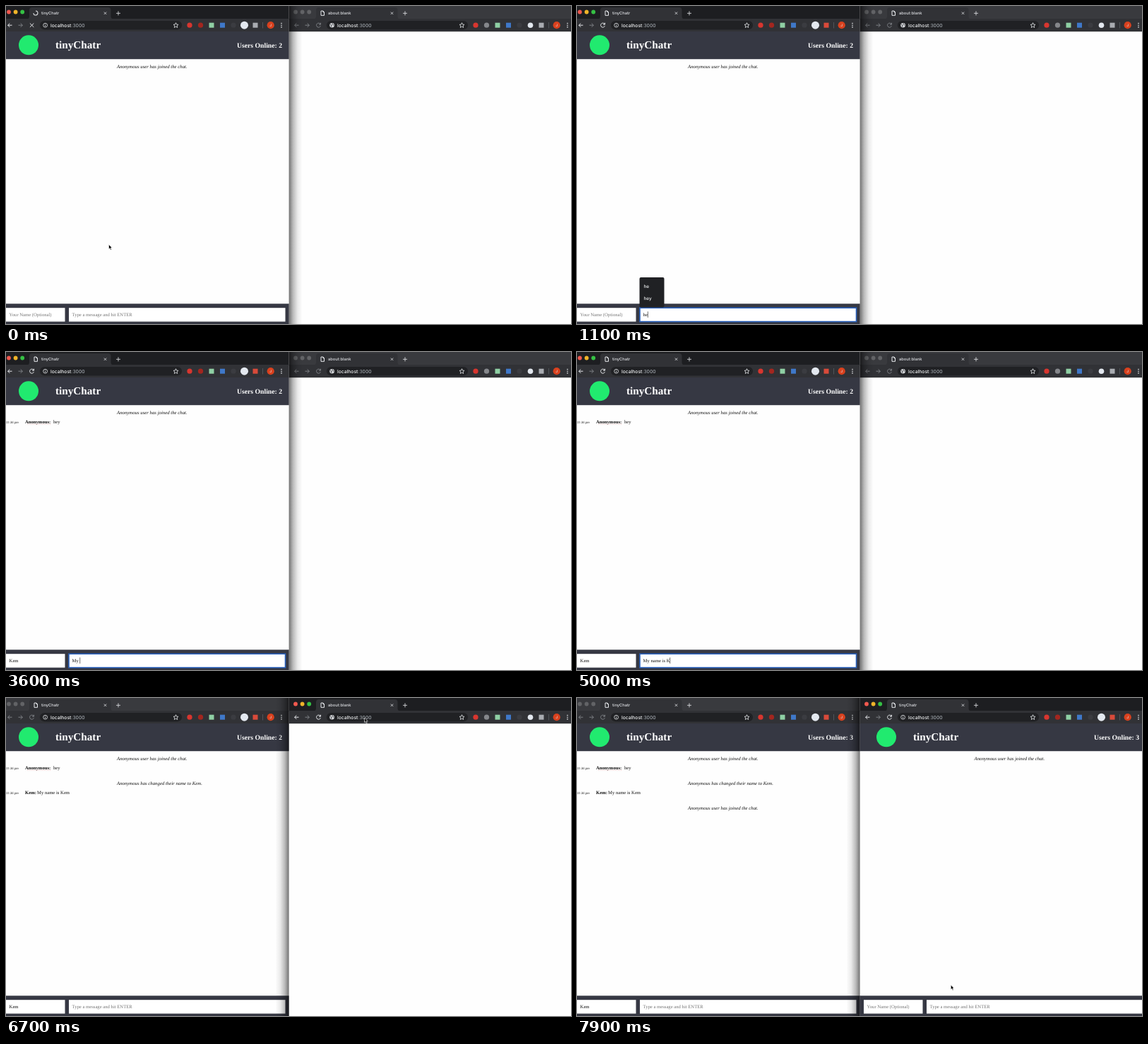
Recreate the animation shown at these times as an HTML page. Size 800x450 px, loop 8000 ms.

```html
<!DOCTYPE html>
<html lang="en">
<head>
<meta charset="utf-8">
<title>Chat demo</title>
<style>
html, body { margin: 0; width: 100%; height: 100%; overflow: hidden; background: #fefefe; }
svg { display: block; width: 800px; height: 450px; }
text { font: 6.67px "Liberation Serif", serif; fill: #111; white-space: pre; text-rendering: geometricPrecision; }
.ui { font: 500 5.75px Inter, sans-serif; fill: #dfe1e5; }
.url { font: 500 6.75px Inter, sans-serif; fill: #f1f3f4; }
.dim { fill: #9aa0a6; }
.menu { font: 500 6.4px Inter, sans-serif; fill: #f1f3f4; }
.title { font-weight: bold; font-size: 15.2px; fill: #fff; }
.users { font-weight: bold; font-size: 9.7px; fill: #fff; }
.note { font-style: italic; font-size: 6.77px; }
.time { font-style: italic; font-size: 4.75px; }
.name { font-weight: bold; }
.hint { fill: #757575; }
.line { fill: none; stroke: #e8eaed; stroke-width: 1; }
.bar { fill: #363843; }
</style>
</head>
<body>
<svg id="stage" viewBox="0 0 800 450"></svg>
<script>
const LOOP = 8000;
const NAME = 'Kem';
const stage = document.getElementById('stage');
const $ = id => document.getElementById(id);
const show = (id, on) => $(id).setAttribute('visibility', on ? 'inherit' : 'hidden');
const attr = (id, key, value) => $(id).setAttribute(key, value);
const text = (x, y, cls, s, extra = '') => `<text x="${x}" y="${y}" class="${cls}" ${extra}>${s}</text>`;
const rect = (x, y, w, h, fill, extra = '') =>
  `<rect x="${x}" y="${y}" width="${w}" height="${h}" fill="${fill}" ${extra}/>`;
const dot = (x, y, r, fill, extra = '') => `<circle cx="${x}" cy="${y}" r="${r}" fill="${fill}" ${extra}/>`;
const line = (d, extra = '') => `<path d="${d}" class="line" ${extra}/>`;

function tabBar(w) {
  const lights = [4, 13.6, 23.2].map((x, i) => dot(x, 8.5, 2.9, '#5f6063', `id="${w}light${i}"`)).join('');
  return rect(-6, 0, 412, 18.5, '#1d1e21', `id="${w}strip"`) + lights +
    `<path d="M29 18.5Q33 18.5 33 14.5V6Q33 2 37 2H144.500Q148.500 2 148.500 6V14.500Q148.500 18.500 152.500 18.500Z" fill="#313236"/>` +
    line('M40 7H43L44.500 8.700V13.300H40ZM43 7V8.700H44.500', `id="${w}file" stroke-width=".8"`) +
    `<g id="${w}spin">${line('M42 7A3 3 0 1 1 39 10')}</g>` +
    text(50, 12.2, 'ui', 'tinyChatr', `id="${w}tab"`) +
    line('M138.800 8.500L142.200 11.900M142.200 8.500L138.800 11.900', 'style="stroke-width:.8"') +
    line('M156 10.300H162M159 7.300V13.300', 'style="stroke-width:.8"');
}

function toolBar(w, shift) {
  const icons = [[260, '#d8362f'], [275.5, '#a3261f'], [291, '#8fd0a4'], [306.500, '#3f78c9'], [322, '#3b3c41'],
    [337.5, '#e3e8ef'], [353, '#d94a3a']]
    .map(([x, c], i) => i === 2 || i === 3 || i === 6
      ? rect(x - 3.5, 23.700, 7, 7, c, `id="${w}ext${i}"`)
      : dot(x, 27.2, i === 5 ? 5.5 : 3.6, c, `id="${w}ext${i}"`)).join('');
  return rect(-6, 18, 412, 18.2, '#313236') +
    line('M8.500 27.200H2.700M5.300 24.500L2.600 27.200L5.300 29.900', `id="${w}back"`) +
    line('M17.500 27.200H23.300M20.700 24.500L23.400 27.200L20.700 29.900', 'style="stroke:#7d8085"') +
    line('M39 25.400A3 3 0 1 0 39.400 28.200M39.500 23.800V26.200H37', `id="${w}reload"`) +
    line('M33.900 24.500L39.300 29.900M39.300 24.500L33.900 29.900', `id="${w}stop"`) +
    rect(48, 21, 201 - shift, 12.4, '#202124', 'rx="6.2"') +
    `<g id="${w}info">${line('M52.700 27.200A2.900 2.900 0 1 0 58.500 27.200A2.900 2.900 0 1 0 52.700 27.200M55.600 26.800V29M55.600 25.200V26', 'style="stroke-width:.8"')}</g>` +
    `<g id="${w}globe">${dot(55.6, 27.2, 3.3, '#d5d7da')}${line('M53.300 26L55 27.200L54.500 29.500M56 24.500L57 26.500L58.200 27.500', 'style="stroke:#34363a"')}</g>` +
    text(63, 29.5, 'url', 'localhost<tspan class="dim">:3000</tspan>') +
    `<g transform="translate(${-shift})">` +
    line('M240.500 23.700L241.500 26.100L244 26.300L242.100 28L242.700 30.500L240.500 29.200L238.300 30.500L238.900 28L237 26.300L239.500 26.100Z', 'style="stroke-width:.8"') +
    icons + rect(363.2, 23, .7, 8.5, '#5f6368') + dot(374.700, 27.2, 5.1, '#d9411e') +
    text(374.7, 29.1, 'ui', 'J', 'text-anchor="middle" style="font-size:5px"') +
    [24.5, 27.2, 29.9].map(y => dot(390, y, .8, '#e8eaed')).join('') + '</g>';
}

function page(w, shift) {
  const note = (id, y, s) => text(157 - shift / 2, y, 'note', s, `id="${w}${id}"`);
  const message = (id, y, who, x, s) => `<g id="${w}${id}">` + text(0, y + .2, 'time', '11:36 pm') +
    text(27, y, 'name', who + ':') + text(x, y, '', s) + '</g>';
  const field = (id, x, width) =>
    rect(x, 427.2, width, 19.4, '#fff', `id="${w}${id}Box"`) +
    text(x + 4.6, 438.8, 'hint', '', `id="${w}${id}"`) +
    rect(0, 432.3, .6, 8.6, '#111', `id="${w}${id}Caret"`);
  return `<g id="${w}page">` +
    rect(-6, 36, 412, 39.2, '', 'class="bar" style="fill:#363843"') +
    dot(32, 55.3, 14, '#21ea6f') + text(70, 60.3, 'title', 'tinyChatr') +
    text(391 - shift, 58.7, 'users', 'Users Online: 2', `id="${w}users" text-anchor="end"`) +
    note('join', 88, 'Anonymous user has joined the chat.') +
    message('msg1', 100.7, 'Anonymous', 67, 'hey') +
    `<path id="${w}under" d="M30 102.200H63" stroke="#d88" stroke-width=".6" stroke-dasharray="1 1"/>` +
    note('rename', 123.2, `Anonymous has changed their name to ${NAME}.`) +
    message('msg2', 135.8, NAME, 44, `My name is ${NAME}`) +
    note('join2', 158.4, 'Anonymous user has joined the chat.') +
    rect(-6, 421.3, 412, 29, '#363843') +
    field('who', 0, 83.5) + field('say', 89, 306.5) +
    `<g id="${w}hints">` + rect(88.5, 384, 35, 42.5, '#202124', 'rx="2"') +
    text(94.5, 399, 'menu', 'he', `id="${w}hint1"`) + text(94.5, 416, 'menu', 'hey') + '</g></g>';
}

const browser = (w, x, shift) => `<g transform="translate(${x})">` +
  rect(-5, 36, 411, 414, '#fefefe') + tabBar(w) + toolBar(w, shift) + page(w, shift) + '</g>';

const fade = (id, from, to) => `<linearGradient id="${id}" x1="${from}" x2="${to}">` +
  [[0, .55], [.3, .27], [.65, .08], [1, 0]].map(([o, a]) => `<stop offset="${o}" stop-opacity="${a}"/>`).join('') +
  '</linearGradient>';

stage.innerHTML = `<defs>${fade('toRight', 0, 1)}${fade('toLeft', 1, 0)}
  <clipPath id="leftHalf"><rect width="400.600" height="450"/></clipPath>
  <clipPath id="rightHalf"><rect x="400.600" width="400" height="450"/></clipPath></defs>
  <g clip-path="url(#leftHalf)">${browser('L', 0, 0)}</g>
  <g clip-path="url(#rightHalf)">${browser('R', 406, 1)}</g>` +
  rect(400.6, 0, 19, 450, 'url(#toRight)', 'id="shadeR"') +
  rect(381.6, 0, 19, 450, 'url(#toLeft)', 'id="shadeL"') +
  `<g id="mouse"><path id="arrow" d="M0 0V6.600L1.500 5.200L2.600 7.800L3.800 7.300L2.700 4.800H4.700Z" stroke="#fff" stroke-width=".6"/>
  <path id="beam" d="M-1.500 0Q0 0 0 1V7Q0 8 -1.500 8M1.500 0Q0 0 0 1M0 7Q0 8 1.500 8" fill="none" stroke="#222" stroke-width=".7"/></g>`;

// Each table holds [time, value...] steps.
const latest = (steps, t) => steps.filter(s => s[0] <= t).pop()?.[1] ?? '';
const typing = (s, from, step) => [...s].map((_, i) => [from + i * step, s.slice(0, i + 1)]);
const sayKeys = [
  ...typing('hey', 1000, 100), [1600, ''],
  ...typing('My name is ' + NAME[0], 3400, 90), [4600, 'My name is ' + NAME.slice(0, 2)],
  [5000, 'My name is ' + NAME[0]], [5100, 'My name is ' + NAME.slice(0, 2)],
  [5200, 'My name is ' + NAME], [5600, '']
];
const whoKeys = typing(NAME, 2500, 100);
const focusKeys = [[600, 'say'], [2200, 'who'], [3100, 'say'], [6600, '']];
const path = [
  [0, 145.5, 337.5], [100, 145.5, 337.5], [600, 150, 432], [1600, 150, 432], [2200, 42, 432],
  [5600, 42, 432], [6400, 507.5, 28], [6900, 507.5, 28], [7300, 493.5, 210], [7800, 528.6, 394.5],
  [7900, 529.3, 406], [8000, 529.3, 406]
];

function mouseAt(t) {
  const i = path.findIndex(p => p[0] > t);
  const [a, b] = [path[i - 1], path[i]];
  const u = (t - a[0]) / (b[0] - a[0]);
  const k = u * u * (3 - 2 * u);
  return [a[1] + (b[1] - a[1]) * k, a[2] + (b[2] - a[2]) * k];
}

function chrome(w, active, loading, t) {
  ['#f0584e', '#f0b429', '#35c144'].forEach((c, i) => attr(w + 'light' + i, 'fill', active ? c : '#626366'));
  attr(w + 'strip', 'fill', active ? '#1d1e21' : '#393a3e');
  for (const id of ['back', 'reload']) $(w + id).style.stroke = active ? '#e8eaed' : '#7d8085';
  show(w + 'spin', loading);
  show(w + 'file', !loading);
  show(w + 'stop', loading);
  show(w + 'reload', !loading);
  attr(w + 'spin', 'transform', `rotate(${t * .36 % 360} 42 10)`);
}

function field(id, value, hint, focused) {
  const el = $(id);
  el.textContent = value || hint;
  attr(id, 'class', value ? '' : 'hint');
  attr(id + 'Box', 'stroke', focused ? '#2a61bd' : 'none');
  attr(id + 'Box', 'stroke-width', 1.6);
  show(id + 'Caret', focused && value);
  if (focused && value) attr(id + 'Caret', 'x', +el.getAttribute('x') + el.getComputedTextLength());
}

function render(t) {
  const rightActive = t >= 6600;
  const visited = t >= 7000;
  const ready = t >= 7500;
  const focus = latest(focusKeys, t);
  const say = latest(sayKeys, t);

  chrome('L', !rightActive, t < 400, t);
  chrome('R', rightActive, visited && t < 7600, t);
  show('shadeR', !rightActive);
  show('shadeL', rightActive);

  attr('Lext6', 'fill', t < 400 ? '#a9acb1' : '#d94a3a');
  attr('Rext6', 'fill', visited ? '#d94a3a' : '#a9acb1');
  attr('Rext1', 'fill', visited ? '#a3261f' : '#85878b');
  attr('Rext5', 'r', visited ? 5.5 : 3.8);
  show('Lglobe', false);
  show('Rglobe', !visited);
  show('Rinfo', visited);
  $('Rtab').textContent = ready ? 'tinyChatr' : visited ? 'localhost:3000' : 'about:blank';

  const joined = t >= 7100;
  $('Lusers').textContent = 'Users Online: ' + (joined ? 3 : 2);
  $('Rusers').textContent = 'Users Online: 3';
  show('Rpage', ready);
  show('Lmsg1', t >= 1600);
  show('Lunder', t >= 1600);
  show('Lrename', t >= 5600);
  show('Lmsg2', t >= 5600);
  show('Ljoin2', joined);
  for (const id of ['msg1', 'under', 'rename', 'msg2', 'join2', 'hints']) show('R' + id, false);
  show('Lhints', t >= 1000 && t < 1200);

  const hints = { who: 'Your Name (Optional)', say: 'Type a message and hit ENTER' };
  field('Lwho', latest(whoKeys, t), hints.who, focus === 'who');
  field('Lsay', say, hints.say, focus === 'say');
  field('Rwho', '', hints.who, false);
  field('Rsay', '', hints.say, false);

  const [x, y] = mouseAt(t);
  const overField = y > 425;
  attr('mouse', 'transform', `translate(${x} ${y})`);
  show('mouse', !(t >= 1000 && t < 1700 || t >= 2400 && t < 5700));
  show('arrow', !overField);
  show('beam', overField);
}

const start = performance.now();
function tick() {
  render((performance.now() - start) % LOOP);
  requestAnimationFrame(tick);
}
tick();
</script>
</body>
</html>
```
